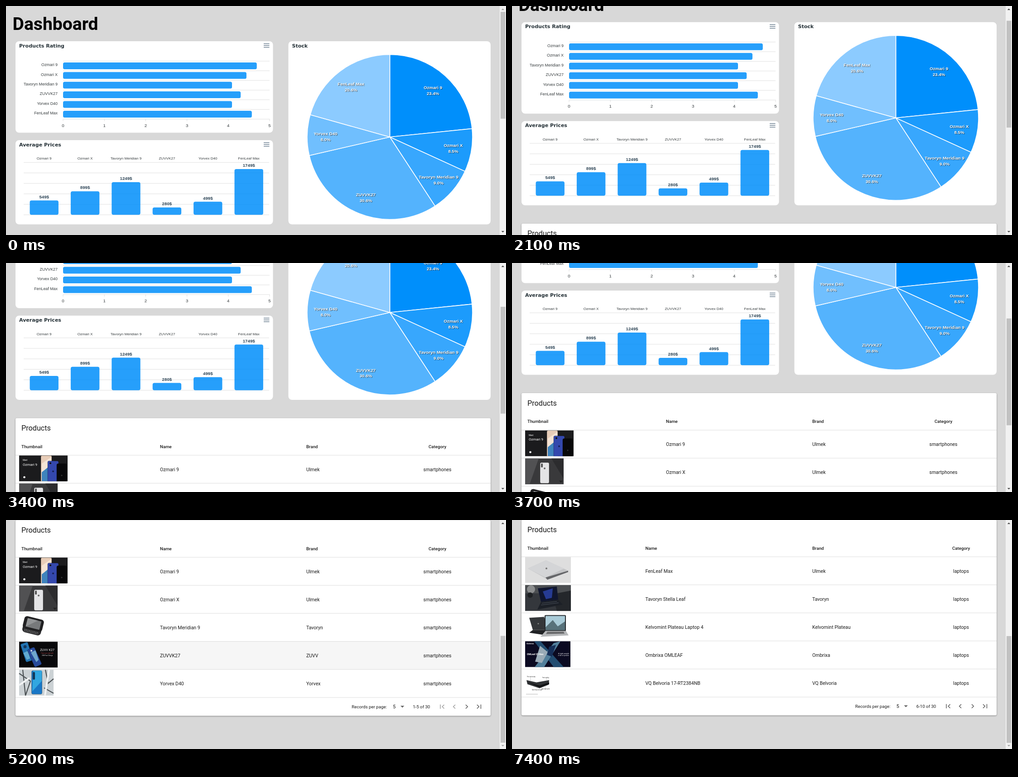
Write an HTML page that moves like this. It is 1104x507 px and loops after 8000 ms.

```html
<!DOCTYPE html>
<html lang="en">
<head>
<meta charset="utf-8">
<title>Dashboard</title>
<style>
html, body { margin: 0; width: 1104px; height: 507px; overflow: hidden; background: #d8d8d8; }
svg { display: block; }
text { white-space: pre; }
.chart { font-family: "Liberation Sans", Arial, sans-serif; fill: #373d3f; }
.title { font: bold 11.05px "DejaVu Sans", sans-serif; fill: #263238; }
.table { font-family: Roboto, sans-serif; fill: #1a1a1a; }
.icon { fill: none; stroke: #555; stroke-width: 1.4; }
.off { stroke: #999; }
.card { filter: drop-shadow(0 1px 1.5px #0006); }
.labels { font-weight: bold; font-size: 9.7px; fill: #fff; filter: drop-shadow(1px 1px .6px #0009); }
#tip { position: absolute; left: 0; top: 0; height: 27px; padding: 0 8px; border-radius: 4px; color: #fff;
  white-space: nowrap; font: 9.7px/25px "Liberation Sans", Arial, sans-serif; box-shadow: 1px 1px 4px -2px #666; }
#tip b { margin-left: 6px; }
</style>
</head>
<body>
<svg id="stage" width="1104" height="507"></svg>
<div id="tip"></div>
<script>
const products = [
  ["Ozmari 9", 4.69, 549, 94], ["Ozmari X", 4.44, 899, 34], ["Tavoryn Meridian 9", 4.09, 1249, 36],
  ["ZUVVK27", 4.3, 280, 123], ["Yorvex D40", 4.09, 499, 32], ["FenLeaf Max", 4.57, 1749, 83]
];
const pages = [
  { nameX: 340, categoryX: 952.5, category: "smartphones", range: "1-5 of 30", shift: 0,
    rows: [["Ozmari 9", "Ulmek"], ["Ozmari X", "Ulmek"], ["Tavoryn Meridian 9", "Tavoryn"], ["ZUVVK27", "ZUVV"], ["Yorvex D40", "Yorvex"]] },
  { nameX: 294.5, categoryX: 991.5, category: "laptops", range: "6-10 of 30", shift: -5.5,
    rows: [["FenLeaf Max", "Ulmek"], ["Tavoryn Stella Leaf", "Tavoryn"], ["Kelvomint Plateau Laptop 4", "Kelvomint Plateau"],
      ["Ombrixa OMLEAF", "Ombrixa"], ["VQ Belvoria 17-RT2384NB", "VQ Belvoria"]] }
];
const ROW = 62.1, TABLE_TOP = 606, MAX_SCROLL = 524.5;

// Motion: [time, values...]
const scrollKeys = [[1900, 0], [2000, 20], [2400, 109], [2600, 162], [3300, 162], [3700, 236], [4200, 323],
  [4600, 323], [4700, 385], [5200, 523.5], [5300, MAX_SCROLL]];
const tipKeys = [[200, 935, 420], [700, 720, 280], [900, 760, 215], [1000, 775, 200], [1400, 860, 170],
  [1600, 865, 165], [1700, 800, 190], [1800, 682, 245]];
const sliceKeys = [[0, -1], [200, 3], [700, 4], [900, 5], [1400, 0], [1700, 5], [1800, 4], [1900, -1]];
const rowKeys = [[0, -1], [5200, 3], [5300, 4], [5500, -1]];

const range = (n, f) => Array.from({ length: n }, (_, i) => f(i)).join("");
const rect = (x, y, w, h, fill, r = 0, more = "") => `<rect x="${x}" y="${y}" width="${w}" height="${h}" rx="${r}" fill="${fill}" ${more}/>`;
const text = (x, y, s, size, more = "") => `<text x="${x}" y="${y}" font-size="${size}" ${more}>${s}</text>`;
const path = (d, stroke, width = 1, more = "") => `<path d="${d}" fill="none" stroke="${stroke}" stroke-width="${width}" ${more}/>`;
const poly = (points, fill) => `<polygon points="${points}" fill="${fill}"/>`;
const dot = (x, y, r, fill) => `<circle cx="${x}" cy="${y}" r="${r}" fill="${fill}"/>`;
const at = (x, y, body, more = "") => `<g transform="translate(${x} ${y}) ${more}">${body}</g>`;
const MIDDLE = 'text-anchor="middle"', END = 'text-anchor="end"', WHITE = 'fill="#fff"';
const shade = i => `rgb(${28 * i},${143 + 12 * i},${251 + 0.8 * i})`;
const panel = (x, y, w, h, title) => rect(x, y, w, h, "#fff", 8) + `<text class="title" x="${x + 8}" y="${y + 13.5}">${title}</text>`;
const menu = y => path(`M569 ${y - 4}h12.5m-12.5 4h12.5m-12.5 4h12.5`, "#6e8192", 1.4);

function ratingChart() {
  const x0 = 126, unit = 91.2, pitch = 21.4, top = 122;
  return panel(21, 78, 568.5, 202.5, "Products Rating") + menu(87.5) +
    range(7, i => path(`M${x0} ${top + i * pitch}H582`, "#e0e0e0")) +
    range(6, i => path(`M${x0 + i * unit} 250v5`, "#e0e0e0") + text(x0 + i * unit, 267.5, i, 9.7, MIDDLE)) +
    products.map(([name, rating], i) =>
      rect(x0, top + 2.9 + i * pitch, rating * unit, 15, "#008ffb", 3.5, 'fill-opacity=".85"') +
      text(114, 133.2 + i * pitch, name, 8.9, END)).join("");
}

function priceChart() {
  const base = 462.2;
  return panel(21, 297, 568.5, 186.5, "Average Prices") + menu(306.5) +
    range(6, i => path(`M39 ${346.3 + i * 23.2}H581`, "#e0e0e0")) +
    products.map(([name, , price], i) => {
      const x = 84.2 + i * 90.4, h = price * 0.0578;
      return text(x, 340, name, 8.1, MIDDLE) +
        rect(x - 31.7, base - h, 63.4, h, "#008ffb", 4, 'fill-opacity=".85"') +
        text(x, base - h - 4.8, price + "$", 9.7, MIDDLE + ' font-weight="bold" fill="#304758"');
    }).join("");
}

function pieChart() {
  const cx = 847.5, cy = 290, r = 182.5;
  const total = products.reduce((sum, p) => sum + p[3], 0);
  const point = (part, radius) => {
    const a = part / total * 2 * Math.PI;
    return [cx + radius * Math.sin(a), cy - radius * Math.cos(a)];
  };
  let sum = 0, slices = "", labels = "";
  products.forEach(([name, , , stock], i) => {
    const [x, y] = point(sum + stock / 2, 142);
    slices += `<path class="slice" d="M${cx} ${cy}L${point(sum, r)}A${r} ${r} 0 0 1 ${point(sum + stock, r)}Z"
      fill="${shade(i)}" stroke="#fff" stroke-width="1.6"/>`;
    labels += text(x, y - 0.7, name, 9.7, MIDDLE) + text(x, y + 12.2, (stock / total * 100).toFixed(1) + "%", 9.7, MIDDLE);
    sum += stock;
  });
  return panel(623.5, 78, 446.5, 405.5, "Stock") + slices + `<g class="labels">${labels}</g>`;
}

const phone = (x, y, w, h, fill, turn = 0) => at(x, y, rect(-w / 2, -h / 2, w, h, fill, 3, 'stroke="#0006" stroke-width=".8"'), `rotate(${turn})`);

// Thumbnails, each 57 high with its left top corner at 0,0
const thumbs = [[
  rect(0, 0, 107, 57, "#1b1b1d") + text(8, 12, "Meet", 4.5, WHITE) + text(8, 22.5, "Ozmari 9", 8, WHITE) + dot(11.5, 48, 2.3, "#fff") +
    `<svg width="107" height="57">${phone(60, 31, 24, 62, "#e8cdb8") + poly("50,30 71,20 71,57 50,57", "#3f83bd") + poly("50,18 71,3 71,20 50,37", "#f5e4d5") +
    phone(75, 41, 24, 58, "#3448ad") + dot(69, 17, 2, "#111") + dot(75, 35, 2, "#172158") + phone(94, 47, 22, 58, "#08080a") + dot(94, 44, 1.5, "#333")}</svg>`,
  rect(0, 0, 85, 57, "#39393b") + poly("0,0 30,0 10,57 0,57", "#515153") + poly("58,0 85,0 85,45", "#2c2c2e") +
    phone(43, 32, 20, 46, "#e4e4e6") + rect(35, 11, 4, 9, "#555", 2) + dot(43, 22, 2, "#666") + poly("75,49 83,49 79,54", "#222"),
  at(30, 28, rect(-21, -3, 42, 20, "#2b2b2d", 7) + rect(-22, -19, 44, 27, "#202022", 6) + rect(-15, -15, 31, 19, "#77797b", 1) +
    poly("-15,4 -15,-15 8,-15", "#929496") + path("M-16 11h32m-32 3h32", "#888", 1.4, 'stroke-dasharray="2 1.5"'), "rotate(14)"),
  rect(0, 0, 85, 57, "#09090b") + phone(17, 23, 17, 42, "#2478b8", -18) + dot(13, 11, 3.5, "#173a60") + poly("9,25 20,20 24,37 17,40", "#65afd8") +
    phone(34, 34, 17, 42, "#294da0", -24) + poly("26,24 36,19 43,40 38,45", "#73add3") + dot(27, 20, 2, "#dce9f5") +
    text(62, 20, "ZUVV K27", 7, MIDDLE + WHITE) + text(62, 26, "Flaunt your style with", 2.9, MIDDLE + 'fill="#c55"') + text(62, 31, "33W Fast Charge", 3.2, MIDDLE + WHITE),
  rect(0, 0, 76, 57, "#ccd2d5") + path("M0 8L25 25 14 57M8 0L14 57M58 0L64 30 76 20M55 40L76 52", "#4b5154", 2.2) + path("M0 34L23 18M66 0L57 57", "#f1f3f4", 4) +
    phone(39, 28, 23, 52, "#1977c6") + poly("31,2 50,2 50,25 29,48", "#32a7e0") + rect(30, 5, 5, 17, "#123858", 2)
], [
  rect(0, 0, 101, 57, "#dedede") + poly("6,25 46,7 95,30 49,49", "#c4c5c7") + poly("6,25 46,7 86,25 45,45", "#d4d5d7") + poly("45,45 95,30 95,33 49,50", "#66676a") + dot(47, 25, 2, "#777"),
  rect(0, 0, 101, 57, "#34373c") + rect(0, 0, 101, 18, "#4b4e51") + poly("60,20 101,12 101,57 70,57", "#24272b") + dot(13, 9, 9, "#8b8d8e") + dot(11, 22, 6, "#1d2023") +
    poly("28,7 70,3 73,32 35,37", "#10162f") + poly("39,14 61,7 59,28 46,31", "#263b93") + poly("35,37 73,32 83,43 27,54", "#1c2027") + path("M37 40L70 36M35 44L74 39", "#4b515c"),
  poly("9,10 42,8 49,37 17,37", "#34373a") + poly("17,37 49,37 42,48 9,43", "#202225") + rect(43, 4, 47, 36, "#25292d", 2) + rect(45, 6, 43, 31, "#a9cbd8") +
    poly("45,31 61,15 72,29 88,18 88,37 45,37", "#58727b") + poly("45,39 90,39 96,49 34,52", "#b5b7b9") + poly("49,41 85,41 87,45 46,46", "#68696b") + dot(29, 23, 1.5, "#888"),
  rect(0, 0, 100, 57, "#0b0a21") + poly("20,0 34,0 85,57 63,57", "#234d71") + poly("63,4 78,0 42,57 21,57", "#527f9b") + poly("33,10 50,24 37,48 22,45", "#9aabb7") +
    poly("53,12 68,8 59,34 48,30", "#152e58") + text(3, 6, "Ombrixa", 4.2, WHITE + ' font-weight="bold"') + text(4, 30, "OMLeaf Z2 Neo", 5.2, WHITE + ' font-weight="bold"') +
    text(97, 28, "A light weight", 4, END + WHITE) + text(97, 32.5, "a lot of power", 4, END + WHITE),
  poly("3,24 25,29 53,24 52,34 32,42 5,33", "#303235") + poly("4,28 32,36 53,29 53,33 32,40", "#111214") + path("M12 18v8M47 19v7M28 40v3M45 36v5", "#aaa", 0.6) +
    text(4, 17, "Thin and sturdy", 2.7) + text(38, 19, "Fast cooling", 2.7) + text(15, 46, "Quiet keys and pad", 2.7) + text(36, 44, "Rear light ports", 2.7) + path("M2 55h26", "#999", 0.7)
]];

function tablePage(page, index) {
  const { nameX, categoryX, category, range: shown, shift, rows } = page;
  const head = (x, s, more = "") => text(x, 590.3, s, 9.7, 'font-weight="500" ' + more);
  const cells = rows.map(([name, brand], i) => {
    const top = TABLE_TOP + i * ROW, y = top + 35;
    return at(29, top + 0.7, thumbs[index][i]) + text(nameX, y, name, 10.5) + text(663, y, brand, 10.5) + text(categoryX, y, category, 10.5, MIDDLE);
  }).join("");
  const icon = (x, d, flip, off) => at(x, 936.7, `<path class="icon ${off ? "off" : ""}" d="${d}"/>`, flip ? "scale(-1 1)" : "");
  const step = "M-2-4.3l4.3 4.3-4.3 4.3", jump = "M-4.5-4.3l4.3 4.3-4.3 4.3M4-4.8v9.6", first = index === 0;
  return `<g class="page">` + head(34, "Thumbnail") + head(nameX, "Name") + head(663, "Brand") + head(categoryX, "Category", MIDDLE) + cells +
    text(841 + shift, 940, "Records per page:", 9.7, END) + text(854.3 + shift, 940.3, "5", 10.8) +
    poly([871 + shift, 934.8, 879.4 + shift, 934.8, 875.2 + shift, 939], "#666") + text(936.3, 940, shown, 9.7, END) +
    icon(963, jump, true, first) + icon(990, step, true, first) + icon(1017, step) + icon(1044.5, jump) + `</g>`;
}

const stage = document.getElementById("stage"), tip = document.getElementById("tip");
stage.innerHTML = rect(0, 0, 1104, 507, "#d8d8d8") +
  `<g id="content"><text x="14.6" y="53" font-family="Roboto, sans-serif" font-weight="700" font-size="39">Dashboard</text>
  <g class="chart">${ratingChart() + priceChart() + pieChart()}</g>
  <g class="table">${rect(21, 524, 1049, 433, "#fff", 3, 'class="card"') + text(34, 551.7, "Products", 16.2) +
    range(6, i => path(`M21 ${TABLE_TOP + i * ROW}H1070`, "#dedede"))}
    <circle id="press" cx="1017" cy="937" r="14"/>
    ${pages.map(tablePage).join("")}
    ${rect(21, TABLE_TOP, 1049, ROW, "#000", 0, 'id="hover" opacity=".035"')}</g></g>` +
  rect(1090, 0, 14, 507, "#f1f1f1") + rect(1092, 13, 10.5, 236.5, "#c1c1c1", 0, 'id="thumb"') +
  `<path id="up" d="M1093.8 9l3.2-3.4 3.2 3.4z"/><path id="down" d="M1093.8 498l3.2 3.4 3.2-3.4z"/>`;

const [content, press, hover, thumb, up, down] = ["content", "press", "hover", "thumb", "up", "down"].map(id => document.getElementById(id));
const slices = document.querySelectorAll(".slice"), tablePages = document.querySelectorAll(".page");
const show = (el, on) => { el.style.display = on ? "" : "none"; };
const held = (keys, t) => keys.findLast(k => k[0] <= Math.max(t, 0))[1];

function tween(keys, t) {
  const next = keys.findIndex(k => k[0] > t);
  if (next < 1) return keys.at(next).slice(1);
  const a = keys[next - 1], b = keys[next], p = (t - a[0]) / (b[0] - a[0]);
  return a.slice(1).map((v, i) => v + (b[i + 1] - v) * p);
}

function render(t) {
  const [scroll] = tween(scrollKeys, t);
  content.setAttribute("transform", `translate(0 ${-scroll})`);
  thumb.setAttribute("y", 13 + scroll / MAX_SCROLL * 244);
  up.setAttribute("fill", scroll > 0 ? "#505050" : "#a3a3a3");
  down.setAttribute("fill", scroll < 520 ? "#505050" : "#a3a3a3");

  // The highlight trails the tooltip slightly
  const lit = held(sliceKeys, t - 100), named = held(sliceKeys, t);
  slices.forEach((s, i) => { s.style.filter = i === lit ? "brightness(1.31)" : ""; });
  show(tip, named >= 0);
  if (named >= 0) {
    const [x, y] = tween(tipKeys, t), [name, , , stock] = products[named];
    tip.innerHTML = `${name}: <b>${stock}</b>`;
    tip.style.background = shade(named);
    tip.style.transform = `translate(${x}px, ${y}px) translateX(-50%)`;
  }

  const row = held(rowKeys, t);
  show(hover, row >= 0);
  hover.setAttribute("y", TABLE_TOP + row * ROW);
  tablePages.forEach((p, i) => show(p, i === (t >= 6600 ? 1 : 0)));
  show(press, t >= 6500 && t < 7000);
  press.setAttribute("opacity", t === 6600 ? 0.2 : 0.12);
}

function frame() {
  render(Math.floor(performance.now() % 8000 / 100) * 100);
  requestAnimationFrame(frame);
}
frame();
</script>
</body>
</html>
```
